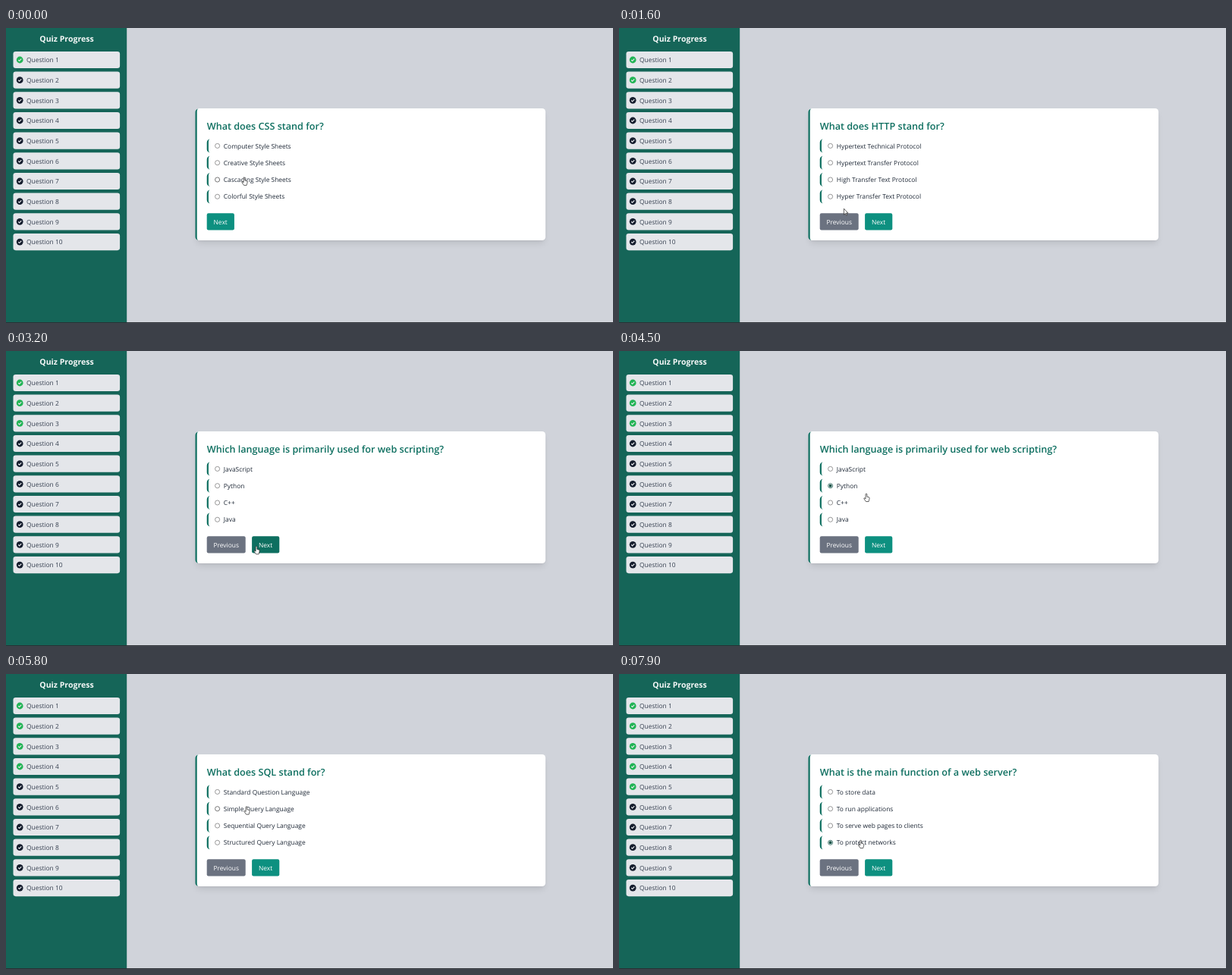
An HTML page that plays this animation: 800x389 px, repeating every 8000 ms.

```html
<!DOCTYPE html>
<html lang="en">
<head>
<meta charset="utf-8">
<title>Quiz</title>
<style>
  html, body { margin: 0; width: 100%; height: 100%; overflow: hidden; background: #d0d3da; }
  #stage { position: absolute; left: 0; top: 0; width: 800px; height: 389px; overflow: hidden; background: #d0d3da; }
  #card {
    position: absolute; left: 249.5px; top: 106.4px; width: 461.1px; height: 173.4px;
    background: #fff; border-radius: 4.4px;
    box-shadow: 0 5.5px 8.3px -1.7px rgba(0,0,0,.1), 0 2.2px 3.3px -2.2px rgba(0,0,0,.1);
  }
  svg { position: absolute; left: 0; top: 0; }
  text { font: 8.42px "Open Sans", "Noto Sans", sans-serif; fill: #1f2937; text-rendering: geometricPrecision; }
  .heading { font-size: 10.55px; font-weight: 700; fill: #f4f7f7; text-anchor: middle; }
  .title { font-size: 12.63px; font-weight: 600; fill: #0e6f60; }
  .item { fill: #374151; }
  .label { fill: #fff; }
</style>
</head>
<body>
<div id="stage">
  <div id="card"></div>
  <svg id="view" width="800" height="389" viewBox="0 0 800 389"></svg>
</div>
<script>
const LOOP = 8000, STEP = 100;
const TEAL = '#0e6f60';
const LEFT = 264.7, ROW = 22.3, BUTTON_Y = 244.3, BUTTON_H = 22.2, NEXT_W = 36.2;

// from: when the question appears; pick, at: chosen option and when;
// optionX, nextX: where the pointer clicks
const quiz = [
  { from: 0, pick: 2, at: 400, optionX: 314, nextX: 292, title: 'What does CSS stand for?',
    options: ['Computer Style Sheets', 'Creative Style Sheets', 'Cascading Style Sheets', 'Colorful Style Sheets'] },
  { from: 1300, pick: 1, at: 2400, optionX: 311, nextX: 330, title: 'What does HTTP stand for?',
    options: ['Hypertext Technical Protocol', 'Hypertext Transfer Protocol', 'High Transfer Text Protocol', 'Hyper Transfer Text Protocol'] },
  { from: 3200, pick: 1, at: 4300, optionX: 324, nextX: 336, title: 'Which language is primarily used for web scripting?',
    options: ['JavaScript', 'Python', 'C++', 'Java'] },
  { from: 5200, pick: 1, at: 5900, optionX: 317, nextX: 345.5, title: 'What does SQL stand for?',
    options: ['Standard Question Language', 'Simple Query Language', 'Sequential Query Language', 'Structured Query Language'] },
  { from: 7100, pick: 3, at: 7800, optionX: 318.6, title: 'What is the main function of a web server?',
    options: ['To store data', 'To run applications', 'To serve web pages to clients', 'To protect networks'] }
];

const rowY = i => 155.4 + i * ROW;

// The pointer alternates between the chosen option and the Next button
const clicks = quiz.flatMap((q, i) => [
  { t: q.at, x: q.optionX, y: rowY(q.pick) - 3 },
  ...(quiz[i + 1] ? [{ t: quiz[i + 1].from, x: q.nextX, y: 257.5 }] : [])
]);

const view = document.getElementById('view');

// Eases from click to click, arriving a little early
function pointerAt(t) {
  const b = clicks.find(c => c.t > t) || clicks[clicks.length - 1];
  const a = clicks[clicks.indexOf(b) - 1] || b;
  const u = a === b ? 1 : Math.min(1, 1.15 * (t - a.t) / (b.t - a.t));
  const e = u * u * (3 - 2 * u);
  return [a.x + (b.x - a.x) * e, a.y + (b.y - a.y) * e];
}

const text = (x, y, cls, s) => `<text x="${x}" y="${y}" class="${cls}">${s}</text>`;
const rect = (x, y, w, h, r, fill) =>
  `<rect x="${x}" y="${y}" width="${w}" height="${h}" rx="${r}" fill="${fill}"/>`;

// Left border that tapers into rounded corners
function edge(x, y, h) {
  const r = 4.4, b = 2.2, n = r - b;
  return `<path fill="${TEAL}" d="M${x + r} ${y}A${r} ${r} 0 0 0 ${x} ${y + r}V${y + h - r}
    A${r} ${r} 0 0 0 ${x + r} ${y + h}A${n} ${r} 0 0 1 ${x + b} ${y + h - r}V${y + r}A${n} ${r} 0 0 1 ${x + r} ${y}Z"/>`;
}

function sidebar(done) {
  let out = rect(0, 0, 159.2, 389, 0, '#156558') + text(80, 18.3, 'heading', 'Quiz Progress');
  for (let i = 0; i < 10; i++) {
    const y = 42 + i * 26.67;
    out += rect(9.5, y - 11.1, 140.6, 22.2, 3.3, '#e4e6ea')
      + `<g transform="translate(18.2 ${y})"><circle r="4.4" fill="${i <= done ? '#22b455' : '#161e2e'}"/>`
      + '<path d="M-2 .1L-.6 1.5 2.1-1.3" fill="none" stroke="#e9ebee" stroke-width="1.15"/></g>'
      + text(27, y + 3.2, 'item', 'Question ' + (i + 1));
  }
  return out;
}

function option(label, i, checked, hover) {
  const y = rowY(i);
  const ring = checked ? (hover ? '#145348' : '#0f766e') : (hover ? '#4b4b4b' : '#767676');
  return edge(LEFT, y - 8.9, 17.8)
    + `<circle cx="278.6" cy="${y}" r="3.05" fill="#fff" stroke="${ring}" stroke-width=".75"/>`
    + (checked ? `<circle cx="278.6" cy="${y}" r="1.95" fill="${ring}"/>` : '')
    + text(286.8, y + 3.1, 'option', label);
}

const button = (x, w, label, fill) =>
  rect(x, BUTTON_Y, w, BUTTON_H, 2.2, fill) + text(x + 8.8, BUTTON_Y + 14.2, 'label', label);

function cursor(x, y, hand) {
  const d = hand
    ? 'M-.9 .9a.9 .9 0 0 1 1.8 0V4l2.2 .5q1.2 .3 1.1 1.5l-.6 2.6-.5 1.8h-3.6l-2.6-3.8q-.2-1.2 .9-.9l1.3 1z'
    : 'M0 0V8L1.9 6.3 3.1 9 4.2 8.5 3 5.9H5.5Z';
  return `<path transform="translate(${x} ${y})" d="${d}" fill="#fff" stroke="#222" stroke-width=".7" stroke-linejoin="round"/>`;
}

function draw(t) {
  const n = quiz.filter(q => q.from <= t).length - 1, q = quiz[n];
  const [x, y] = pointerAt(t);
  const nextX = n ? 324.1 : LEFT;
  const over = (left, w) => x >= left && x <= left + w && y >= BUTTON_Y && y <= BUTTON_Y + BUTTON_H;
  const onNext = over(nextX, NEXT_W);
  const onPrev = n > 0 && over(LEFT, 51);
  const row = q.options.findIndex((_, i) => Math.abs(y - rowY(i)) < ROW / 2);

  view.innerHTML = sidebar(n)
    + edge(249.5, 106.4, 173.4)
    + text(LEFT, 133.6, 'title', q.title)
    + q.options.map((o, i) => option(o, i, i === q.pick && t >= q.at, i === row)).join('')
    + (n ? button(LEFT, 51, 'Previous', onPrev ? '#4b5563' : '#6b7280') : '')
    + button(nextX, NEXT_W, 'Next', onNext ? TEAL : '#0d9080')
    + rect(0, 388, 800, 1, 0, '#2a2f33')
    + cursor(x, y, onNext || onPrev || row >= 0);
}

const start = performance.now();
let last = -1;
function tick() {
  const t = Math.floor(((performance.now() - start) % LOOP) / STEP) * STEP;
  if (t !== last) draw(last = t);
  requestAnimationFrame(tick);
}
tick();
</script>
</body>
</html>
```
